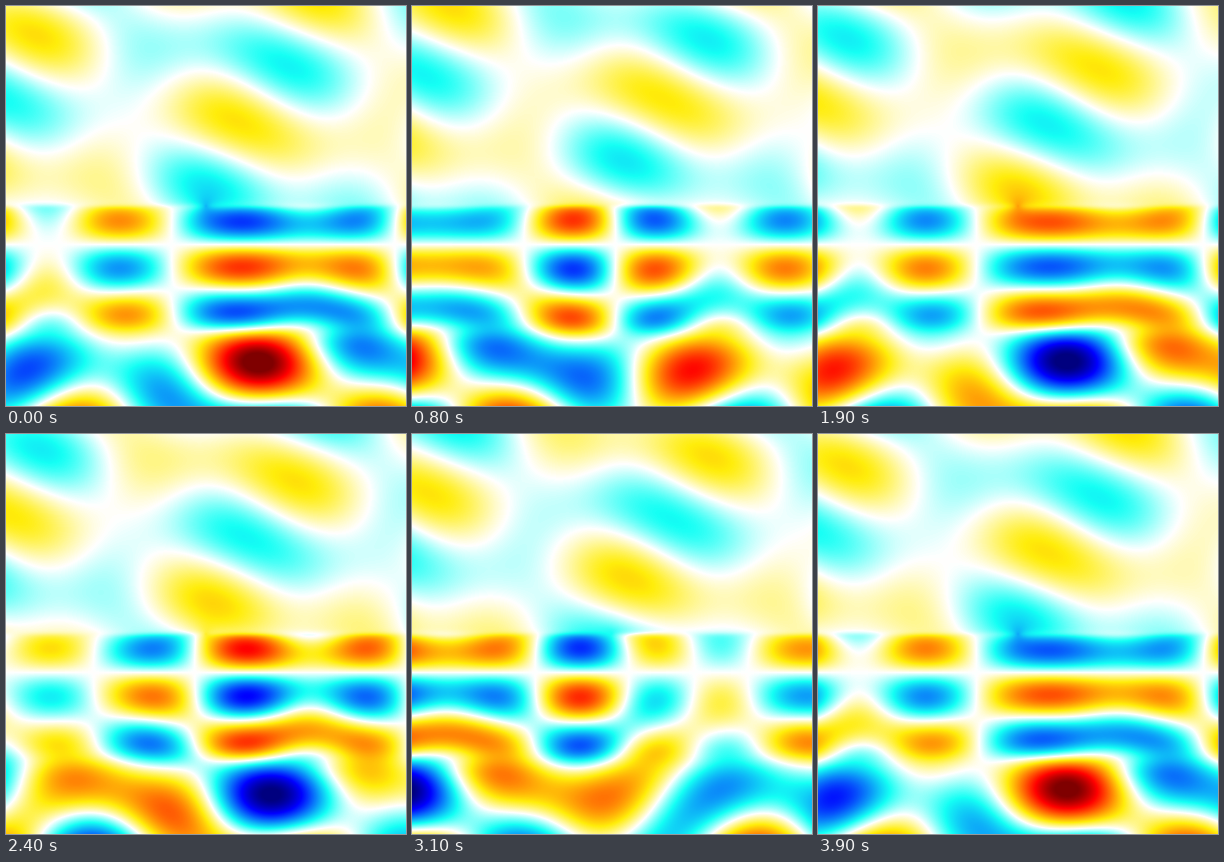
These frames come from a looping animation (400x400 px, 4000 ms). A matplotlib script:

```python
import numpy as np
import matplotlib.pyplot as plt
from matplotlib.animation import FuncAnimation
from matplotlib.colors import LinearSegmentedColormap

SIZE = 400
FRAMES = 40
INTERVAL = 100

G = 2 * np.pi / (SIZE * 2 / 3)   # grating wavenumber
BLOCH = 0.732                    # sideways wavenumber of the incident wave, in G
K_AIR, K_SLAB = 2.0, 3.1         # wavenumbers in the two media, in G
TOP, BOTTOM = 200, 325           # faces of the slab
NODE = 238.5                     # height of the standing wave's common node

CMAP = LinearSegmentedColormap.from_list("waves", [
    (0, (0, 0, 0.5)), (0.125, (0, 0, 1)), (0.375, (0.08, 1, 0.96)),
    (0.5, (1, 1, 1)), (0.625, (1, 0.93, 0.04)), (0.875, (1, 0, 0)),
    (1, (0.5, 0, 0))], N=512)

x = np.arange(SIZE) + 0.5
y = x[:, None]


def polar(size, degrees):
    return size * np.exp(1j * np.radians(degrees))


def sideways(order):
    return BLOCH + order


def vertical(order, k):
    return G * np.sqrt(k ** 2 - sideways(order) ** 2)


def across(order):
    return np.exp(1j * sideways(order) * G * x)


def travelling(order, amp, start, direction):
    """Plane wave in air; direction is +1 downwards, -1 upwards."""
    ky = vertical(order, K_AIR)
    return amp * np.exp(1j * direction * ky * (y - start)) * across(order)


def standing(order, amp):
    return amp * np.sin(vertical(order, K_SLAB) * (y - NODE)) * across(order)


def step_at(edge, width):
    return 1 / (1 + np.exp(-(y - edge) / width))


# Diffraction orders and their complex amplitudes in each region
sent = {-2: polar(0.03, -20), -1: polar(0.084, 171),
        0: polar(0.127, 194), 1: polar(0.075, 204)}
trapped = {-3: polar(0.10, 72), -2: polar(0.11, 130), -1: polar(0.20, 109),
           0: polar(0.39, 98), 1: polar(0.30, -118)}
returned = {-2: polar(0.165, 69), -1: polar(0.09, 60),
            0: polar(0.243, 88), 1: polar(0.23, 117)}
incident = polar(0.366, 149)

above = sum(travelling(m, a, 90, -1) for m, a in sent.items())
slab = sum(standing(m, a) for m, a in trapped.items())
below = sum(travelling(m, a, 345, 1) for m, a in returned.items())
below = below + travelling(0, incident, 345, -1)

into_slab, out_of_slab = step_at(TOP, 1.5), step_at(BOTTOM, 6)
inside = slab + out_of_slab * (below - slab)
amplitude = above + into_slab * (inside - above)

# Small hot spot at the scatterer on the upper face
radius = np.hypot(x - SIZE / 2, y - TOP)
amplitude = amplitude + polar(0.2, 170) * np.exp(-radius / 8)

fig = plt.figure(figsize=(4, 4), dpi=100)
ax = fig.add_axes([0, 0, 1, 1])
ax.axis("off")
image = ax.imshow(amplitude.real, cmap=CMAP, vmin=-1, vmax=1,
                  interpolation="nearest", aspect="auto")


def draw(step):
    turn = np.exp(-2j * np.pi * step / FRAMES)
    image.set_data((amplitude * turn).real)
    return [image]


anim = FuncAnimation(fig, draw, frames=FRAMES, interval=INTERVAL, repeat=True)
plt.show()
```
